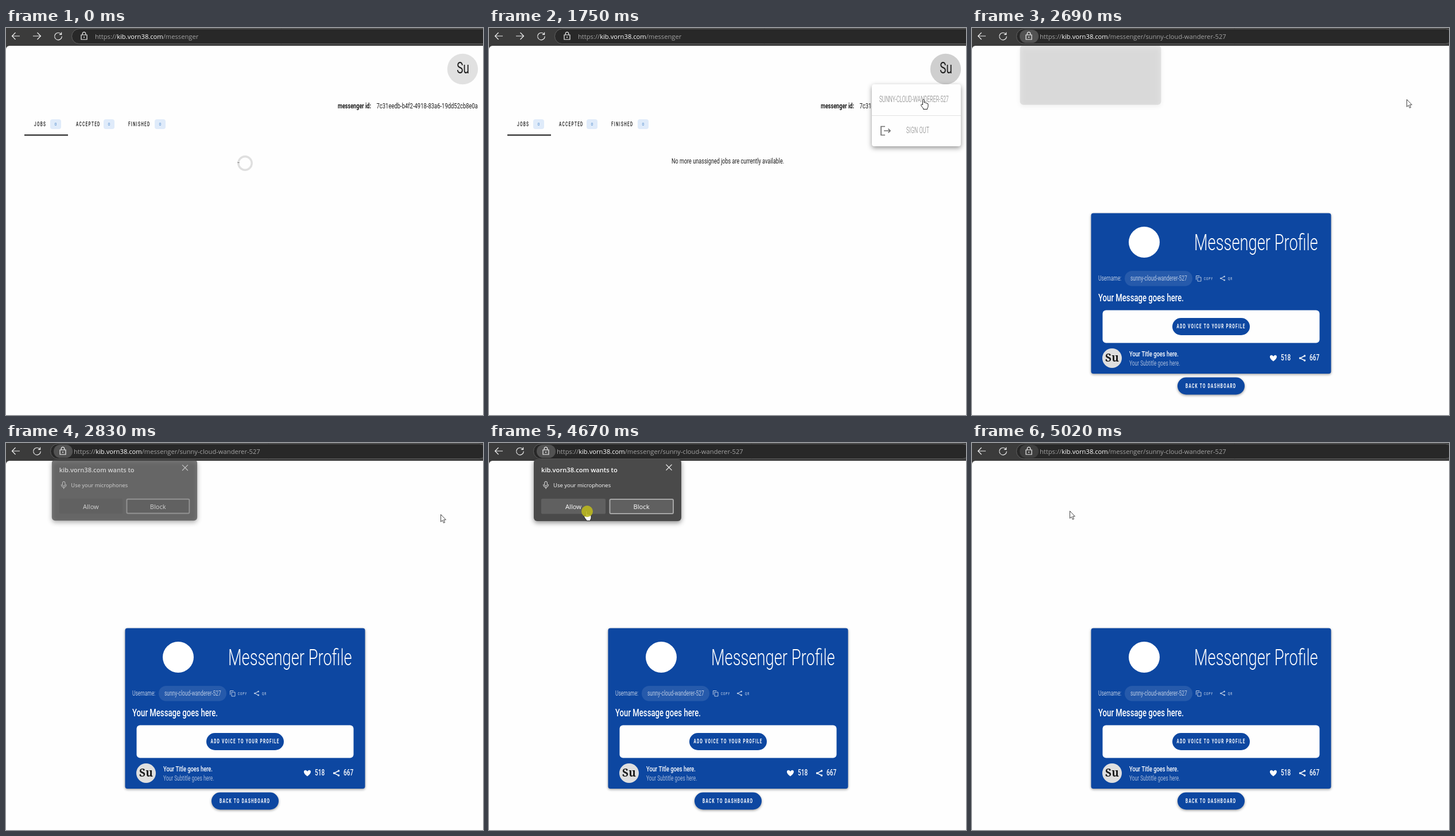
Animation, 831 px wide and 674 px high, one loop 5.09 s. Source, as an HTML page with a canvas:

```html
<!DOCTYPE html>
<html lang="en">
<head>
<meta charset="utf-8">
<title>Messenger profile</title>
<style>
html, body { margin: 0; width: 100%; height: 100%; overflow: hidden; background: #fefefe; }
canvas { display: block; }
</style>
</head>
<body>
<canvas id="stage" width="831" height="674"></canvas>
<script>
const g = document.getElementById('stage').getContext('2d');
const LOOP = 5090, STEP = 70;
const ANCHORS = [0, 2280, 2690, 3570, 3650, 4670];
const UI = '"Open Sans", "Noto Sans", sans-serif';
const FACE = 'Roboto, "Liberation Sans", sans-serif';
const COND = 0.7, CAPS = 0.58;
const BLUE = '#0d47a1';
const HOST = 'kib.vorn38.com';
const USER = 'sunny-cloud-wanderer-527';
const ID = '7c31eedb-b4f2-4918-83a6-19dd52cb8e0a';

const PATH = [
  [0, 846, 108], [70, 827, 101], [350, 802, 88], [560, 790, 80],
  [1190, 790, 80], [1260, 788, 84], [1680, 758, 123], [1750, 757, 124],
  [3500, 757, 124], [3570, 725, 129], [3820, 450, 133], [4070, 199, 120],
  [4140, 152, 110], [4210, 170, 118], [LOOP, 170, 118]
];
const HAND_TIMES = [[350, 1260], [1400, 2350], [4140, 4810]];
const CLICKS = [700, 2280, 4670];

const clamp = v => Math.max(0, Math.min(1, v));
const ramp = (t, a, b) => clamp((t - a) / (b - a));
const smooth = u => u * u * (3 - 2 * u);

function text(s, x, y, size, o = {}) {
  g.save();
  g.translate(x, y);
  g.scale(o.k || 1, 1);
  g.font = `${o.w || 400} ${size}px ${o.f || FACE}`;
  g.letterSpacing = (o.ls || 0) + 'px';
  g.textAlign = o.align || 'left';
  g.fillStyle = o.c || '#1c1c1c';
  g.fillText(s, 0, 0);
  const width = g.measureText(s).width;
  g.restore();
  return width;
}
const cond = (s, x, y, size, o) => text(s, x, y, size, { k: COND, ...o });
const caps = (s, x, y, size, o) => text(s, x, y, size, { k: CAPS, ls: 2.2, w: 500, ...o });
const ui = (s, x, y, size, o) => text(s, x, y, size, { f: UI, ...o });

function box(x, y, w, h, r, fill, stroke, lw = 1) {
  g.beginPath();
  g.roundRect(x, y, w, h, r);
  if (fill) { g.fillStyle = fill; g.fill(); }
  if (stroke) { g.strokeStyle = stroke; g.lineWidth = lw; g.stroke(); }
}

function raised(x, y, w, h, r, fill, blur, dy, alpha) {
  g.save();
  g.shadowColor = `rgba(0,0,0,${alpha})`;
  g.shadowBlur = blur;
  g.shadowOffsetY = dy;
  box(x, y, w, h, r, fill);
  g.restore();
}

function disc(x, y, r, fill) {
  g.beginPath();
  g.arc(x, y, r, 0, 7);
  g.fillStyle = fill;
  g.fill();
}

function line(d, x, y, color, lw) {
  g.save();
  g.translate(x, y);
  g.strokeStyle = color;
  g.lineWidth = lw;
  g.stroke(new Path2D(d));
  g.restore();
}

function shape(d, x, y, fill, stroke) {
  const p = new Path2D(d);
  g.save();
  g.translate(x, y);
  g.lineJoin = 'round';
  g.fillStyle = fill;
  g.fill(p);
  if (stroke) { g.strokeStyle = stroke; g.lineWidth = 1; g.stroke(p); }
  g.restore();
}

function share(x, y, s, color) {
  line(`M${s} ${-s}L${-s} 0L${s} ${s}`, x, y, color, s * 0.35);
  for (const [i, j] of [[1, -1], [-1, 0], [1, 1]]) disc(x + i * s, y + j * s, s * 0.42, color);
}

function toolbar(t) {
  const moved = t >= 2420, dx = moved ? -37 : 0;
  g.fillStyle = '#3b3b3b';
  g.fillRect(0, 0, 831, 36);
  box(0, 31, 840, 650, [6, 0, 0, 0], '#fefefe');
  line('M7 0H-6.5M-.5 -6L-6.5 0L-.5 6', 17, 14, '#f0f0f0', 1.2);
  if (!moved) line('M-7 0H6.5M.5 -6L6.5 0L.5 6', 54, 14, '#f0f0f0', 1.2);
  line('M5 -3.8A6.3 6.3 0 1 0 6.3 0M5.6 -7V-3.2H1.8', 91 + dx, 14.5, '#f0f0f0', 1.2);
  box(114.5 + dx, 1.5, 760, 26, 13, '#282828', '#606060');
  const lit = t < 2690 ? 0 : 1 - 0.45 * ramp(t, 4740, 5020);
  if (lit) {
    g.globalAlpha = lit;
    box(83, 3, 33, 23, 11.5, '#525252');
    g.globalAlpha = 1;
  }
  line('M-5 -2.5H5V5.5H-5ZM-2.8 -2.5V-4.5A2.8 2.8 0 0 1 2.8 -4.5V-2.5', 136 + dx, 14.5, '#f0f0f0', 1.2);
  disc(136 + dx, 16, 1, '#f0f0f0');
  let x = 155 + dx;
  x += ui('https://', x, 19, 11.2, { c: '#a3a3a3' });
  x += ui(HOST, x, 19, 11.2, { c: '#ffffff' });
  ui('/messenger' + (moved ? '/' + USER : ''), x, 19, 11.2, { c: '#a3a3a3' });
}

function spinner(t) {
  const u = t / 1400 % 1, round = 125.6;
  const grow = smooth(clamp(u * 2)), shift = smooth(clamp(u * 2 - 1));
  const offset = 15 * grow + 109 * shift;
  const len = Math.min(1 + 99 * grow, round - offset);
  const from = (185 + t * 0.116 + offset / round * 360) * Math.PI / 180;
  g.lineWidth = 3.4;
  g.strokeStyle = '#dfdfdf';
  g.beginPath();
  g.arc(416.5, 235.5, 11.7, 0, 7);
  g.stroke();
  g.strokeStyle = '#1c1c1c';
  g.beginPath();
  g.arc(416.5, 235.5, 11.7, from, from + len / round * 2 * Math.PI);
  g.stroke();
}

function tab(label, x, badge) {
  caps(label, x, 170.5, 11.2);
  box(badge, 159, 19, 17, 4, '#dfebfa');
  text('0', badge + 9.5, 170, 7, { c: '#4f8acb', align: 'center' });
}

function menu(t) {
  const a = ramp(t, 700, 910);
  if (!a) return;
  g.globalAlpha = a;
  raised(667, 98, 155, 108, 4, '#fefefe', 8, 3, 0.42);
  g.fillStyle = '#e2e2e2';
  g.fillRect(667, 152, 155, 1);
  const press = ramp(t, 2280, 2490);
  if (press) {
    g.save();
    g.beginPath();
    g.rect(667, 105, 155, 40);
    g.clip();
    disc(745, 125, 78 * press, '#bababa');
    g.restore();
  }
  const o = { w: 300, ls: 0, c: '#757575' };
  caps(USER.toUpperCase(), 680, 129, 14.7, o);
  caps('SIGN OUT', 727, 183, 14.7, { ...o, ls: 0.5 });
  line('M7 0H0V15H7M5 7.5H16M12.5 4L16 7.5L12.5 11', 683, 171.5, '#707070', 1.7);
  g.globalAlpha = 1;
}

function dashboard(t) {
  const shade = Math.round(225 - 36 * ramp(t, 420, 980) + 20 * ramp(t, 1260, 1820));
  disc(795.5, 71.5, 26.7, `rgb(${shade},${shade},${shade})`);
  cond('Su', 796, 79, 27, { align: 'center' });
  cond('messenger id:', 578, 139.5, 13, { w: 700 });
  cond(ID, 822, 139.5, 13.5, { align: 'right' });
  tab('JOBS', 49, 77);
  tab('ACCEPTED', 122, 170);
  tab('FINISHED', 213, 259);
  g.fillStyle = '#151515';
  g.fillRect(32, 185.5, 76, 2);
  if (t < 1400) spinner(t);
  else cond('No more unassigned jobs are currently available.', 318, 235.5, 13);
  menu(t);
}

function profile() {
  const pale = '#b9c9e2';
  raised(207.5, 322.5, 418, 279.5, 4, BLUE, 4, 1.5, 0.4);
  disc(300, 373, 27, '#ffffff');
  cond('Messenger Profile', 387, 387, 39, { w: 300, c: '#ffffff' });
  cond('Username:', 220, 439.5, 12, { c: pale });
  box(266, 423, 118, 26.5, 13, 'rgba(255,255,255,.1)');
  cond(USER, 276, 439.5, 12, { c: pale });
  line('M0 7V0H6M2.5 2.5H8.5V9.5H2.5Z', 390.5, 431.5, pale, 1);
  caps('COPY', 404, 438.5, 8, { c: pale, ls: 1.8 });
  share(436.5, 436, 3.2, pale);
  caps('QR', 446, 438.5, 8, { c: pale, ls: 1.8 });
  cond('Your Message goes here.', 220, 476, 18.8, { w: 500, c: '#ffffff' });
  box(227.5, 491.5, 378, 57, 6, '#fefefe');
  box(349, 505, 135, 30, 15, BLUE);
  caps('ADD VOICE TO YOUR PROFILE', 356.5, 523, 11.2, { w: 700, c: '#ffffff' });
  disc(244, 575, 17, '#dfdfdf');
  text('Su', 244, 581, 19, { w: 800, f: '"Noto Serif", "DejaVu Serif", serif', align: 'center' });
  cond('Your Title goes here.', 274, 571.5, 13.3, { w: 500, c: '#ffffff' });
  cond('Your Subtitle goes here.', 274, 588, 12, { c: '#a5b9da' });
  shape('M0 5.5C-9 -1 -6 -5.5 -3 -5.2Q-1 -5 0 -3Q1 -5 3 -5.2C6 -5.5 9 -1 0 5.5Z', 525, 575, '#ffffff');
  cond('518', 538, 579, 14.4, { w: 500, c: '#ffffff' });
  share(575.5, 575, 4, '#ffffff');
  cond('667', 588, 579, 14.4, { w: 500, c: '#ffffff' });
  raised(358, 608.5, 117, 30, 15, BLUE, 4, 1.5, 0.4);
  caps('BACK TO DASHBOARD', 372, 627, 11.2, { w: 700, c: '#ffffff' });
}

function prompt(t) {
  const a = t < 4000 ? 0.13 + 0.87 * ramp(t, 2690, 2900) : ramp(t, 4990, 4790);
  if (t < 2690 || a <= 0) return;
  const s = 0.95 + 0.05 * a;
  g.save();
  g.globalAlpha = a;
  g.translate(206.5, 82);
  g.scale(s, s);
  g.translate(-206.5, -82);
  raised(78, 28, 257, 108, 6, '#4a4a4a', 8, 3, 0.45);
  if (a > 0.2) {
    const c = '#ffffff';
    ui(HOST + ' wants to', 91, 51, 11.2, { w: 600, c });
    line('M-5 -5L5 5M5 -5L-5 5', 313.5, 42.5, '#f0f0f0', 1.1);
    box(96.8, 67, 4.6, 8, 2.3, null, '#f0f0f0');
    line('M-4.3 0V1A4.3 4.3 0 0 0 4.3 1V0M0 5.3V8', 99.1, 72, '#f0f0f0', 1);
    ui('Use your microphones', 112, 77, 9.5, { c });
    box(91, 97, 112, 26.5, 2, '#606060');
    ui('Allow', 147, 115, 11.2, { c, align: 'center' });
    box(210.5, 98, 110.5, 25, 2, '#606060', '#a6a6a6', 2);
    ui('Block', 265.5, 115, 11.2, { c, align: 'center' });
  }
  g.restore();
}

function position(t) {
  const i = Math.max(1, PATH.findIndex(p => p[0] > t));
  const [t0, x0, y0] = PATH[i - 1], [t1, x1, y1] = PATH[i];
  const u = ramp(t, t0, t1);
  return [x0 + (x1 - x0) * u, y0 + (y1 - y0) * u];
}

function cursor(t) {
  const [x, y] = position(t);
  if (HAND_TIMES.some(([a, b]) => t >= a && t < b)) {
    shape('M-1.5 10V1.5Q-1.5 .3 -.2 .3Q1.1 .3 1.1 1.5V6Q2.5 5.2 3.6 6.6Q5 6 6 7.4Q8 7 8 9V12.5Q8 14 6.6 16V17.5H-.4V16Q-2.5 14 -4.3 10.6Q-4.6 9 -3.2 8.9Q-2.2 9 -1.5 10Z', x, y, '#ffffff', '#222222');
  } else {
    shape('M.5 .5V13.2L3.4 10.6L5.4 15.2L7.5 14.3L5.5 9.8H9.4Z', x, y, '#ffffff', '#444444');
  }
  for (const start of CLICKS) {
    const u = (t - start) / 140;
    if (u < 0 || u >= 1) continue;
    g.globalAlpha = 0.9 * (1 - u);
    disc(x + 1, y + 1, 10 + 20 * u, '#bab71f');
    g.globalAlpha = 1;
  }
}

function draw(now) {
  const clock = now % LOOP;
  const base = ANCHORS.filter(a => a <= clock).pop();
  const t = base + Math.floor((clock - base) / STEP) * STEP;
  toolbar(t);
  if (t < 2560) dashboard(t);
  else profile();
  prompt(t);
  cursor(t);
}

let origin;
function tick(now) {
  origin ??= now;
  draw(Math.max(0, now - origin));
  requestAnimationFrame(tick);
}
draw(0);
requestAnimationFrame(tick);
</script>
</body>
</html>
```
